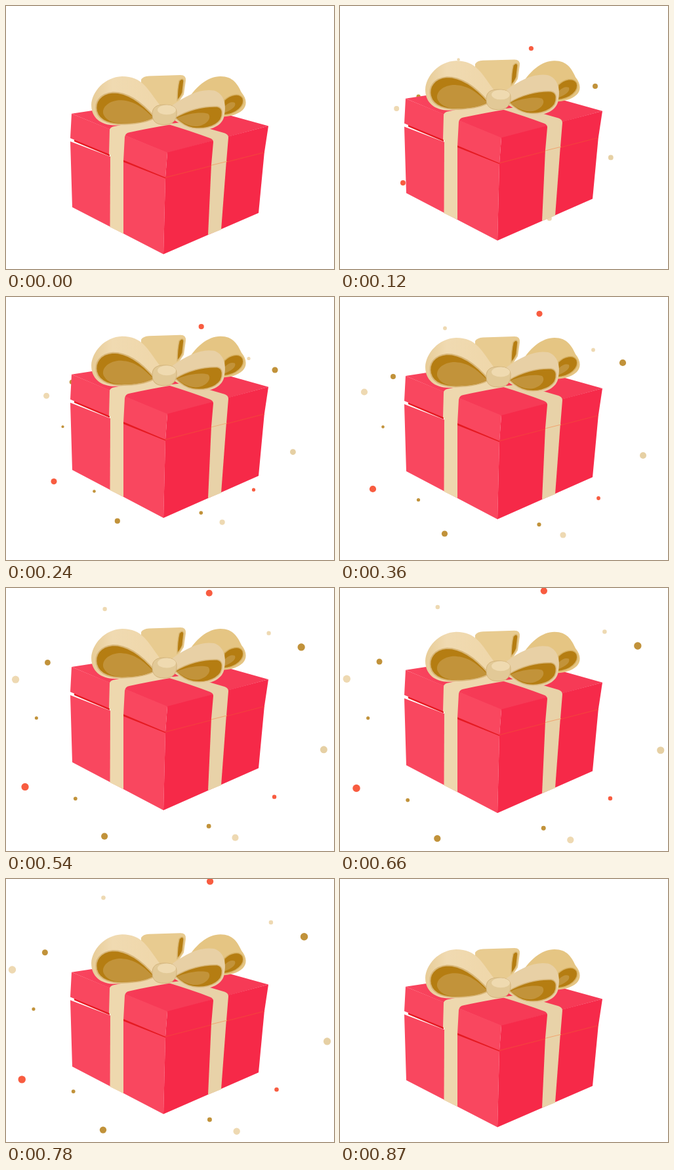
An HTML page for the animation above (0.9 s loop, 500x400 px).

```html
<!DOCTYPE html>
<html lang="en">
<head>
<meta charset="utf-8">
<title>Gift box</title>
<style>
  html, body { margin: 0; width: 100%; height: 100%; overflow: hidden; background: #fff; }
  svg { display: block; width: 500px; height: 400px; }
</style>
</head>
<body>
<svg viewBox="0 0 500 400">
  <defs>
    <linearGradient id="top" gradientUnits="userSpaceOnUse" x1="100" y1="0" x2="200" y2="0">
      <stop offset="0" stop-color="#f9465f"/><stop offset="1" stop-color="#f63a56"/>
    </linearGradient>
    <linearGradient id="fold" gradientUnits="userSpaceOnUse" x1="132" y1="0" x2="232" y2="0">
      <stop offset="0" stop-color="#e8cd99"/><stop offset=".3" stop-color="#f0dab1"/><stop offset="1" stop-color="#efd7aa"/>
    </linearGradient>
  </defs>
  <g id="dots"></g>
  <g id="box">
    <!-- body -->
    <path fill="#f9475f" d="M98 163L160 187L243 219L240 338L101 265Z"/>
    <path fill="#f62948" d="M243 218L394 178L385 274L240 338Z"/>
    <path fill="#e51a22" d="M104 160L158 181V186L104 163Z"/>
    <path fill="#e51a22" d="M179 191L243 217V220.500L179 195Z"/>
    <!-- lid -->
    <path fill="url(#top)" d="M100 120L250 97L400 139L246 181Z"/>
    <path fill="#f9475f" d="M100 120L246 180L243 219L160 184L98 158Z"/>
    <path fill="#f62a4a" d="M246 180L400 139L394 179L243 219Z"/>
    <path fill="none" stroke="#f4403f" stroke-width="1.200" d="M243 219L394 180"/>
    <!-- ribbon -->
    <path fill="#eed8ae" d="M159 182L179 191V306L158.500 296Z"/>
    <path fill="#eed8ae" d="M157 183L158 145Q158 142 163 140Q195 133 232 128L256 136Q220 142 188 149Q182 150 181 156L179 193Z"/>
    <path fill="#e8d2a8" d="M313 198L336 192L328 300L308 308Z"/>
    <path fill="#e8d2a8" d="M246 136L272 133Q303 141 333 150Q339 152 339 157L336 194L313 199L316 164Q316 160 311 158Q282 147 246 136Z"/>
    <path fill="none" stroke="#f0a56f" stroke-width="1" d="M313 200L337 194"/>
    <!-- back loop -->
    <path fill="#e8cb90" d="M206 67Q209 62 218 61.500L266 60Q275 60 274 69L271 90L258 110H226Q216 82 206 73Z"/>
    <path fill="#b57d12" stroke="#d9b774" stroke-width="1.500" d="M264 69Q269 63 271 69L269 87Q266 95 261 99Q261 82 264 69Z"/>
    <!-- right rear loop -->
    <path fill="#e5c583" d="M272 107C288 77 308 62 327 62C346 62 353 74 359 87C368 98 367 108 361 114C352 122 342 124 328 125Z"/>
    <path fill="#b57d12" stroke="#d6b062" stroke-width="1.500" d="M333 99C342 90 356 87 361 96C365 107 352 121 330 122Z"/>
    <path fill="#c2933a" d="M334 108Q342 100 349 103Q352 111 332 119Z"/>
    <!-- left loop -->
    <path fill="url(#fold)" d="M234 106C216 82 208 62 177 62C150 63 131 86 130 106C130 126 144 138 166 138C190 138 212 136 230 129Z"/>
    <path fill="#b57d12" stroke="#d8b678" stroke-width="2" d="M227 126C204 99 184 87 163 87C143 89 135 102 138 116C142 132 161 138 185 136C204 135 217 132 227 126Z"/>
    <path fill="#c2933a" d="M224 126C206 107 192 99 172 99C153 101 145 113 149 122C155 134 170 136 186 135C204 134 214 132 224 126Z"/>
    <!-- right front loop -->
    <path fill="#e8d0a5" d="M252 108C277 90 297 81 317 84C333 89 337 107 332 126C327 142 306 147 290 145C275 143 264 134 255 129Z"/>
    <path fill="#b57d12" stroke="#d8b678" stroke-width="1.500" d="M258 126C276 115 300 108 322 109C332 111 330 123 327 129C318 142 298 144 285 142C273 140 264 132 258 126Z"/>
    <path fill="#c2933a" d="M260 127C278 119 298 117 308 120C314 126 307 135 298 138C284 143 270 135 260 127Z"/>
    <!-- knot -->
    <path fill="#e2c997" stroke="#d3b47c" stroke-width="1" d="M223 121C223 110 229 106 242 106C256 106 261 111 260 121C259 132 253 137 241 137C229 137 223 132 223 121Z"/>
    <ellipse fill="#efdab0" cx="245" cy="114" rx="14" ry="7.500"/>
  </g>
</svg>
<script>
const LOOP = 900, STEP = 30, END = 870;
const RED = '#f85c40', GOLD = '#c1923a', CREAM = '#eed9b2', SAND = '#e6d0a4';

// x, y, drift x, drift y, radius, colour
const specks = [
  [304, 25.5, 6.3, -19.5, 4.6, RED],
  [160, 47.5, -10.3, -17, 2.9, CREAM],
  [386, 80.5, 16, -13, 2.9, CREAM],
  [431, 100, 21, -11, 5.1, GOLD],
  [81, 121, -19.3, -8.3, 4, GOLD],
  [37, 144.5, -24.6, -5.8, 5.1, CREAM],
  [65.5, 197.5, -21, 0.3, 2.3, GOLD],
  [462, 241, 24.6, 5.3, 5, SAND],
  [50, 292, -23, 11.5, 5.1, RED],
  [394, 306, 16.5, 12.8, 2.9, RED],
  [119.5, 308.5, -15, 13, 2.6, GOLD],
  [159.5, 360, -10.3, 19.3, 4.6, GOLD],
  [303.5, 346, 6.2, 17.8, 3.1, GOLD],
  [340, 362, 10.4, 19.4, 4.6, CREAM]
];

const box = document.getElementById('box');
const dots = document.getElementById('dots');
const circles = specks.map(s => {
  const c = document.createElementNS('http://www.w3.org/2000/svg', 'circle');
  c.setAttribute('fill', s[5]);
  return dots.appendChild(c);
});

// Quick rise, slight overshoot, hold, accelerating fall
function lift(t) {
  if (t <= 240) return 1.05 * t / 240;
  if (t < 330) return 1 + 0.025 * (1 + Math.cos(Math.PI * (t - 240) / 90));
  if (t <= 540) return 1;
  return 1 - Math.min(1, (t - 540) / 330) ** 2.2;
}

// Steady burst, then easing out
function spread(t) {
  if (t <= 360) return t / 120 - 3;
  return 1.12 * (1 - Math.max(0, 1 - (t - 360) / 480) ** 3.57);
}

function draw(t) {
  const down = 1 - lift(t);
  box.setAttribute('transform', `matrix(1 0 0 ${1 - 0.0198 * down} 0 ${46.2 * down})`);

  dots.style.display = t >= STEP && t < END ? '' : 'none';
  const d = spread(t);
  specks.forEach(([x, y, dx, dy, r], i) => {
    circles[i].setAttribute('cx', x + dx * d);
    circles[i].setAttribute('cy', y + dy * d);
    circles[i].setAttribute('r', r * (1 + 0.11 * d));
  });
}

let start;
function tick(now) {
  start ??= now;
  const t = (now - start) % LOOP;
  draw(Math.floor(t / STEP + 0.001) * STEP);
  requestAnimationFrame(tick);
}
draw(0);
requestAnimationFrame(tick);
</script>
</body>
</html>
```
